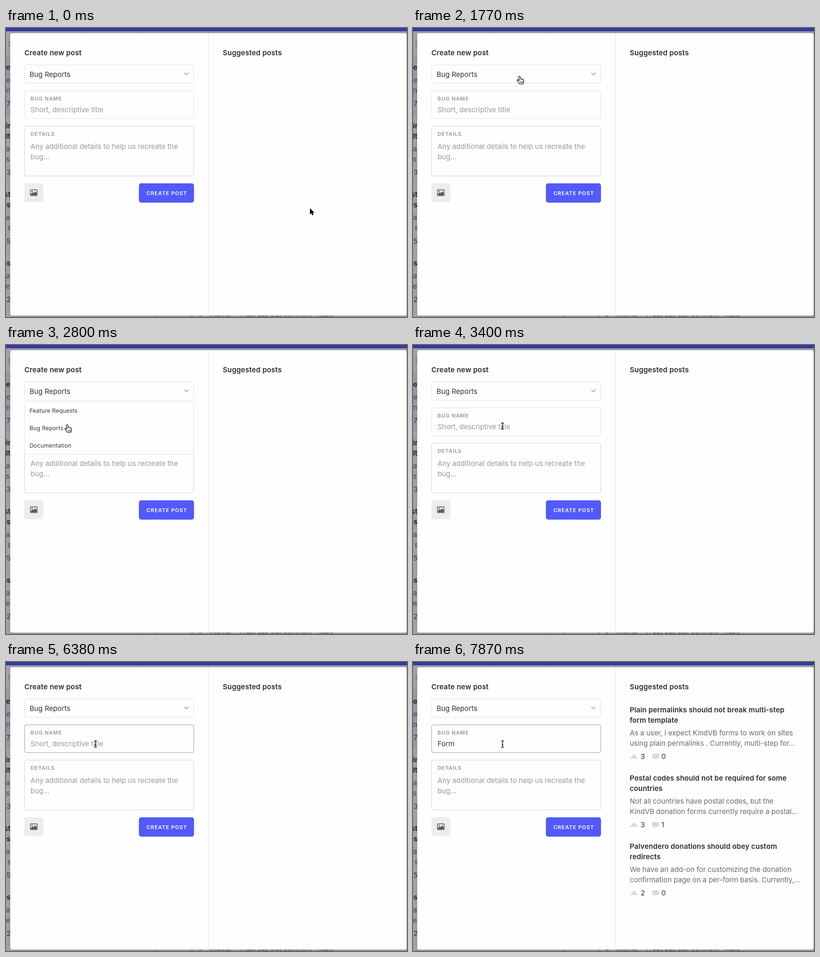
Recreate the animation shown at these times as an HTML page. Size 851 by 614 pixels, loop 8 s.

```html
<!DOCTYPE html>
<html lang="en">
<head>
<meta charset="utf-8">
<title>Create new post</title>
<style>
  html, body { margin: 0; width: 100%; height: 100%; overflow: hidden; background: #a3a3a3; }
  svg { display: block; }
  text { font: 400 15px Inter, "Open Sans", sans-serif; fill: #333; letter-spacing: -.04px; white-space: pre; }
  .title { font-weight: 600; letter-spacing: .12px; fill: #2b2b2b; }
  .heading { font-weight: 600; letter-spacing: .22px; fill: #2b2b2b; }
  .label { font-size: 11px; font-weight: 600; letter-spacing: .9px; fill: #969696; }
  .hint { fill: #999; }
  .body { fill: #6a6a6a; }
  .option { font-size: 12px; letter-spacing: .2px; }
  .button { font-size: 11px; font-weight: 600; letter-spacing: 1px; fill: #fff; }
  .meta { font-size: 13px; fill: #3c3c3c; }
  .dimBold { font-weight: 600; fill: #1c1c1c; }
  .dimBody { fill: #474747; }
  .dimHint { fill: #6b6b6b; }
  .box { fill: #fefefe; stroke: #e3e3e3; }
</style>
</head>
<body>
<svg width="851" height="614" viewBox="0 0 851 614">
  <defs>
    <filter id="shadow" x="-5%" y="-5%" width="110%" height="110%">
      <feDropShadow dx="0" dy="0" stdDeviation="3" flood-opacity=".14"/>
    </filter>
    <path id="beamShape" d="M-3 -6.500Q0 -6.800 0 -4.500Q0 -6.800 3 -6.500M0 -4.500V5M-3 7Q0 7.300 0 5Q0 7.300 3 7M-1.500 2H1.500"/>
  </defs>

  <g id="backdrop">
    <rect width="851" height="614" fill="#a3a3a3"/>
    <rect y="59" width="287" height="124" fill="#9a9aa6"/>
    <path d="M0 59.5H287M0 183.5H287M0 329.5H287M0 475.5H287M0 599.5H287M172.5 7V59M287.5 7V614" stroke="#8f8f8f"/>
    <rect x="318" y="600" width="5" height="14" fill="#909090"/>
    <rect width="851" height="7" fill="#343a9f"/>
    <circle cx="395" cy="609" r="3.5" fill="none" stroke="#666"/>
    <text class="meta" x="408" y="613">0</text>
    <text class="meta" x="421" y="613">·  Internal  ·  A day ago  ·</text>
    <text class="meta" x="562" y="613">Edit Comment</text>
    <text class="meta" x="661" y="613">Reply</text>
  </g>

  <rect x="9" y="11" width="841" height="600" rx="4" fill="#fefefe" filter="url(#shadow)"/>
  <path d="M429.5 11V611" stroke="#e5e5e5"/>

  <text class="heading" x="39" y="58">Create new post</text>
  <text class="heading" x="460" y="58">Suggested posts</text>

  <rect class="box" x="39.5" y="78.5" width="359" height="39" rx="4"/>
  <text x="50" y="104">Bug Reports</text>
  <path d="M378.5 95L383 99.5 387.5 95" fill="none" stroke="#999" stroke-width="1.3"/>

  <rect class="box" x="39.5" y="133.5" width="359" height="59" rx="4"/>
  <rect id="focus" x="39.5" y="133.5" width="359" height="59" rx="4" fill="none" stroke="#a0a0a0"/>
  <text class="label" x="52" y="154">BUG NAME</text>
  <text id="name" x="52" y="179"></text>
  <rect id="caret" y="164" width="1" height="18" fill="#111"/>

  <rect class="box" x="39.5" y="208.5" width="359" height="106" rx="4" style="stroke:#d2d2d2"/>
  <text class="label" x="52" y="229">DETAILS</text>
  <text class="hint" x="52" y="257">Any additional details to help us recreate the</text>
  <text class="hint" x="52" y="279">bug...</text>

  <rect x="39" y="330" width="40" height="40" rx="4" fill="#ededed"/>
  <rect x="51.7" y="343.7" width="14.6" height="12.6" rx="1.5" fill="none" stroke="#555" stroke-width="1.4"/>
  <path d="M53 355V352.5L56.5 349 58.5 351 62 347 65 350.5V355Z" fill="#555"/>
  <circle cx="55.5" cy="347" r="1.3" fill="#555"/>

  <rect x="282" y="330" width="117" height="41" rx="5" fill="#525af9"/>
  <text class="button" x="298" y="355">CREATE POST</text>

  <g id="menu">
    <rect class="box" x="39.5" y="120.5" width="359" height="112" rx="3"/>
    <text class="option" x="50" y="144">Feature Requests</text>
    <text class="option" x="50" y="181">Bug Reports</text>
    <text class="option" x="50" y="218">Documentation</text>
  </g>

  <g id="suggestions"></g>

  <g id="arrow">
    <path d="M0 0V13.5L3.1 10.6 5 15 7.5 14 5.6 9.7H9.7Z" stroke="#fff" stroke-width="2" paint-order="stroke"/>
  </g>
  <g id="hand" stroke="#000" stroke-linecap="round" stroke-linejoin="round">
    <path fill="#fff" stroke-width="1.2" d="M-1.6 1Q-1.4 -.6 0 -.6T1.6 1L2.2 5.3Q3.6 4.4 4.7 5.7Q6.2 5 7 6.5Q9 6.2 9 8.3V11Q8.500 13 7.500 16H.3Q-.8 13.500 -2.800 11.300L-4.700 8.800Q-5.400 7.200 -4 6.900Q-2.700 7 -.6 8.700Z"/>
    <path d="M2.2 10.5V13.5M4.3 10.5V13.5M6.3 10.5V13.5" stroke-width=".9"/>
  </g>
  <g id="beam" fill="none">
    <use href="#beamShape" stroke="#fff" stroke-width="2.6"/>
    <use href="#beamShape" stroke="#000" stroke-width="1.3"/>
  </g>
</svg>

<script>
const LOOP = 8000;
const $ = id => document.getElementById(id);

function add(parent, tag, attrs, content = '') {
  const node = document.createElementNS('http://www.w3.org/2000/svg', tag);
  for (const key in attrs) node.setAttribute(key, attrs[key]);
  node.textContent = content;
  parent.append(node);
}
const write = (parent, cls, x, y, content) => add(parent, 'text', { class: cls, x, y }, content);

// Slivers of the post list left of the dialog
const slivers = [
  ['S', 4, 39, 'dimHint'],
  ['ne', -9, 89, 'dimBold'], ['he', -8, 116, 'dimBody'], ['m', -4, 138, 'dimBody'], ['7', 1, 166, ''],
  ['in', 0, 213, 'dimBold'], ['lt', 0, 235, 'dimBold'], ['a', 0, 262, 'dimBody'], ['s', 0, 284, 'dimBody'], ['3', 1, 312, ''],
  ['st', -4, 359, 'dimBold'], ['ps', -8, 381, 'dimBold'], ['a', 0, 408, 'dimBody'], ['s', 3, 430, 'dimBody'], ['5', 1, 458, ''],
  ['ps', -8, 505, 'dimBold'], ['a', 0, 532, 'dimBody'], ['te', -5, 554, 'dimBody'], ['2', 1, 582, '']
];
for (const [content, x, y, cls] of slivers) write($('backdrop'), cls, x, y, content);

const posts = [
  [3, 0, 'Plain permalinks should not break multi-step', 'form template',
    'As a user, I expect KindVB forms to work on sites', 'using plain permalinks . Currently, multi-step for...'],
  [3, 1, 'Postal codes should not be required for some', 'countries',
    'Not all countries have postal codes, but the', 'KindVB donation forms currently require a postal...'],
  [2, 0, 'Palvendero donations should obey custom', 'redirects',
    'We have an add-on for customizing the donation', 'confirmation page on a per-form basis. Currently,...']
];
posts.forEach(([votes, comments, ...lines], i) => {
  const group = $('suggestions'), top = 145 * i;
  lines.forEach((line, n) =>
    write(group, n < 2 ? 'title' : 'body', 460, top + [107, 129, 156, 178][n], line));
  add(group, 'path', { fill: '#d9d9d9', transform: `translate(460 ${top + 195})`, d: 'M0 10L9 .5 18 10Z' });
  add(group, 'path', { fill: '#d9d9d9', transform: `translate(508 ${top + 195})`,
    d: 'M1 0H13Q14 0 14 1V9Q14 10 13 10H7L4 13V10H1Q0 10 0 9V1Q0 0 1 0Z' });
  write(group, '', 483, top + 206, votes);
  write(group, '', 527, top + 206, comments);
});

// Arrow travel from the right pane to the select box
const glide = k => ({ x: 645 - 418 * k, y: 383 - 283 * k });

// Each step changes only the listed parts
const steps = [
  [0, { cursor: 'arrow', ...glide(0), focus: 0, caret: 0, menu: 0, typed: '', found: 0 }],
  [140, glide(.1)],
  [290, glide(.36)],
  [440, glide(.66)],
  [580, { ...glide(.87), focus: .5 }],
  [720, { ...glide(.97), focus: 1, caret: 1 }],
  [870, glide(1)],
  [1320, { y: 101, focus: 0, caret: 0, menu: .35 }],
  [1470, { menu: 0 }],
  [1770, { cursor: 'hand', x: 226, y: 103 }],
  [2060, { menu: .5 }],
  [2210, { menu: 1 }],
  [2510, { x: 160, y: 128 }],
  [2660, { x: 82, y: 160 }],
  [2800, { x: 130, y: 170 }],
  [2950, { x: 190, y: 173 }],
  [3400, { cursor: 'beam', y: 172, menu: 0 }],
  [3700, { y: 174, focus: .4, caret: 1 }],
  [3850, { focus: .85 }],
  [3990, { focus: 1 }],
  [4440, { caret: 0 }],
  [4890, { caret: 1 }],
  [5490, { caret: 0 }],
  [5930, { caret: 1 }],
  [6380, { caret: 0 }],
  [6680, { typed: 'F', caret: 1 }],
  [6830, { typed: 'Fo' }],
  [6980, { typed: 'For' }],
  [7130, { typed: 'Form' }],
  [7570, { caret: 0, found: .3 }],
  [7720, { found: .75 }],
  [7870, { found: 1 }]
];

function draw(time) {
  const state = Object.assign({}, ...steps.filter(([at]) => at <= time).map(([, change]) => change));
  const name = $('name');
  name.textContent = state.typed || 'Short, descriptive title';
  name.setAttribute('class', state.typed ? '' : 'hint');
  const end = state.typed ? name.getComputedTextLength() : 0;
  $('caret').setAttribute('x', Math.round(52 + end));
  for (const id of ['focus', 'caret', 'menu']) $(id).style.opacity = state[id];
  $('suggestions').style.opacity = state.found;
  for (const id of ['arrow', 'hand', 'beam']) {
    $(id).setAttribute('transform', `translate(${state.x} ${state.y})`);
    $(id).style.display = id === state.cursor ? '' : 'none';
  }
}

const start = performance.now();
function tick() {
  draw((performance.now() - start) % LOOP);
  requestAnimationFrame(tick);
}
tick();
</script>
</body>
</html>
```
